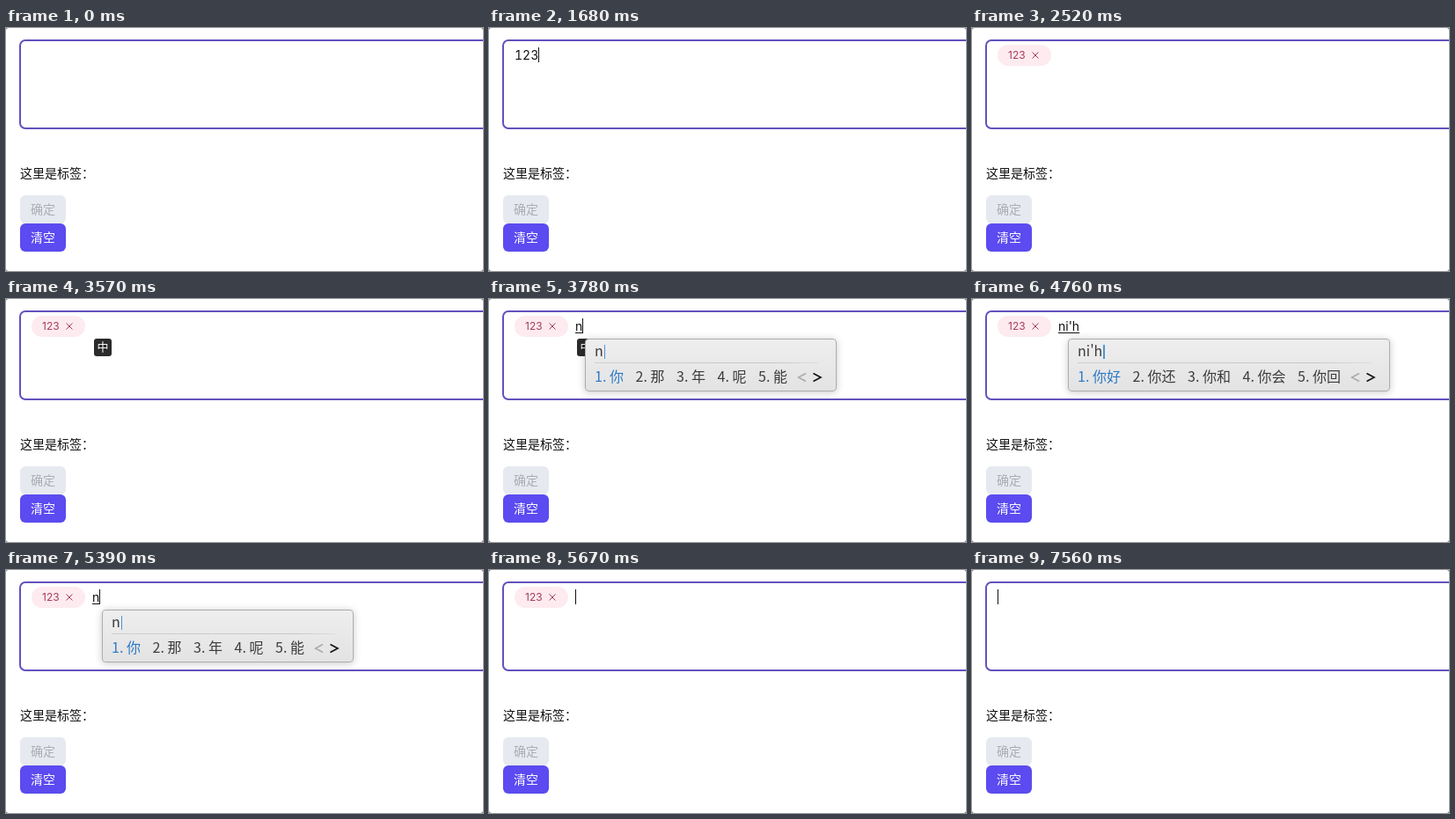
Write an HTML page that moves like this. It is 542 px wide and 276 px high and loops after 7770 ms.

```html
<!DOCTYPE html>
<html lang="zh-CN">
<head>
<meta charset="utf-8">
<title>标签输入框</title>
<style>
  html, body { margin: 0; width: 100%; height: 100%; overflow: hidden; background: #777; }
  body { position: relative; font: 14px "Noto Sans CJK SC", "Noto Sans CJK", sans-serif; color: #111; }
  .window { position: absolute; left: 0; top: 0; width: 542px; height: 276px; overflow: hidden; background: #fff; border-radius: 3px; }
  .window > *, .ime > * { position: absolute; box-sizing: border-box; white-space: pre; }

  .field { left: 15px; top: 13px; width: 560px; height: 102px; border: 2px solid #6152bd; border-radius: 7px; }
  .label { left: 16px; top: 154px; line-height: 20px; }
  .button { left: 16px; width: 52px; height: 32px; border-radius: 6px; line-height: 31px; text-align: center; }
  .confirm { top: 190px; background: #e6e9f0; color: #abadb3; }
  .clear { top: 222px; background: #5b4bf0; color: #fff; font-weight: 500; }

  .tag { left: 29px; top: 19px; width: 61px; height: 24px; padding-left: 12px; border-radius: 12px;
         background: #fdebf0; color: #a83c5a; font: 12px/24px Inter, sans-serif; }
  .tag svg { position: absolute; left: 39px; top: 8px; }

  .entry { display: flex; top: 22px; height: 18px; font: 14px/18px Inter, sans-serif; font-variant-numeric: tabular-nums; }
  .composing { text-decoration: underline 1px; text-underline-offset: 2px; text-decoration-skip-ink: none; }
  .caret { width: 1px; height: 17px; background: #111; }

  .badge { left: 100px; top: 45px; width: 20px; height: 20px; border-radius: 3px;
           background: #2b2b2b; color: #fff; font-size: 13px; line-height: 18px; text-align: center; }

  .ime { left: 109px; top: 45px; height: 60px; border: 1px solid #adadad; border-radius: 4px;
         background: linear-gradient(#eee, #e3e3e3); box-shadow: 0 1px 9px rgba(0, 0, 0, .22);
         font-size: 16px; line-height: 24px; color: #3c3c3c; }
  .pinyin { display: flex; align-items: center; left: 10px; top: 0; height: 24px; }
  .pinyin i { width: 1.5px; height: 16px; margin: 3px 0 0 1px; background: #4f92d8; }
  .rule { left: 10px; right: 20px; top: 26px; height: 1px; background: linear-gradient(90deg, #cfcfcf, #c6c6c6 80%, #dedede); }
  .candidate { top: 29px; }
  .candidate:first-child { color: #2d79c7; }
  .list { left: 0; top: 0; }
  .list span { position: absolute; white-space: pre; }
  .arrows { right: 15px; top: 37px; }
</style>
</head>
<body>
<div class="window">
  <div class="field"></div>
  <div class="tag">123<svg width="8" height="8" fill="none" stroke="#a83c5a"><path d="M.5 .5 7.5 7.5M7.5 .5 .5 7.5"/></svg></div>
  <div class="entry"><span class="text"></span><span class="caret"></span></div>
  <div class="badge">中</div>
  <div class="ime">
    <div class="pinyin"><span class="spelling"></span><i></i></div>
    <div class="rule"></div>
    <div class="list"></div>
    <svg class="arrows" width="29" height="12" fill="none" stroke-width="1.6">
      <path d="M10 1.5 1.5 6 10 10.5" stroke="#aaa"/>
      <path d="M18.5 1.5 27 6 18.5 10.5" stroke="#111"/>
    </svg>
  </div>
  <div class="label">这里是标签：</div>
  <div class="button confirm">确定</div>
  <div class="button clear">清空</div>
</div>
<script>
const LOOP = 7770, TICK = 70;
const BADGE = { show: 3290, fade: 3780, hide: 4620 };
const TAG = { show: 1960, solid: 2030, hide: 6510 };

const candidates = {
  "n": ["你", "那", "年", "呢", "能"],
  "ni": ["你", "妮", "呢", "尼", "腻"],
  "ni'h": ["你好", "你还", "你和", "你会", "你回"],
};

// [start time, typed text, caret visible]
const steps = [
  [0, "", false], [630, "", true],
  [1190, "1", true], [1330, "12", true], [1680, "123", true],
  [1960, "", true], [2520, "", false], [3080, "", true], [3570, "", false],
  [3780, "n", true], [3990, "ni", true], [4200, "ni'h", true], [4760, "ni'h", false],
  [5040, "ni", true], [5390, "n", true],
  [5670, "", true], [6230, "", false],
  [6510, "", true], [7070, "", false], [7560, "", true],
];

const find = name => document.querySelector("." + name);
const [tag, entry, text, caret, badge, ime, spelling, list] =
  ["tag", "entry", "text", "caret", "badge", "ime", "spelling", "list"].map(find);

function showCandidates(pinyin) {
  const words = candidates[pinyin];
  ime.style.visibility = words ? "visible" : "hidden";
  if (!words) return;
  const pitch = 30.5 + 16 * words[0].length;
  spelling.textContent = pinyin;
  ime.style.width = 206 + 80 * words[0].length + "px";
  list.innerHTML = words.map((word, i) =>
    `<span class="candidate" style="left:${10 + i * pitch}px">${i + 1}. ${word}</span>`).join("");
}

function badgeOpacity(t) {
  if (t < BADGE.show || t >= BADGE.hide) return 0;
  return Math.min(1, 1 - (t - BADGE.fade) / (BADGE.hide - BADGE.fade));
}

function tagOpacity(t) {
  if (t < TAG.show || t >= TAG.hide) return 0;
  return t < TAG.solid ? .6 : 1;
}

let shownText;
function render(now) {
  const t = Math.floor(now % LOOP / TICK) * TICK;
  const [, typed, caretOn] = steps.findLast(([start]) => start <= t);
  const tagged = tagOpacity(t);

  tag.style.opacity = tagged;
  badge.style.opacity = badgeOpacity(t);
  entry.style.left = (tagged ? 98 : 29) + "px";
  caret.style.visibility = caretOn ? "visible" : "hidden";
  if (typed !== shownText) {
    shownText = text.textContent = typed;
    text.classList.toggle("composing", typed in candidates);
    showCandidates(typed);
  }
}

const origin = performance.now();
function loop() {
  render(performance.now() - origin);
  requestAnimationFrame(loop);
}
loop();
</script>
</body>
</html>
```
